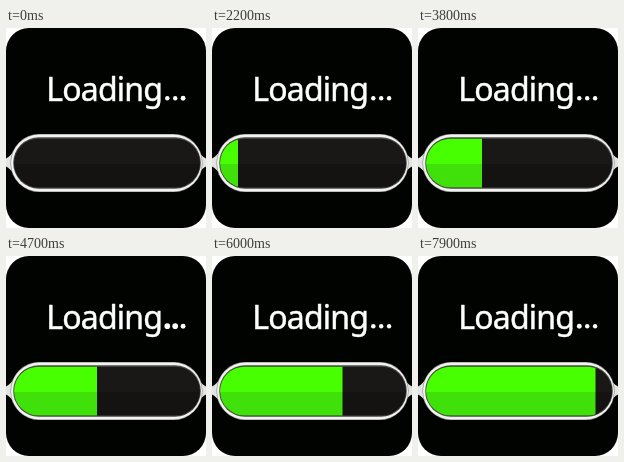
An HTML page that plays this animation: 200 by 200 pixels, repeating every 8000 ms.

```html
<!DOCTYPE html>
<html lang="en">
<head>
<meta charset="utf-8">
<title>Loading</title>
<style>
html, body { margin: 0; width: 100%; height: 100%; overflow: hidden; background: #fff; }
svg { display: block; width: 100vw; height: 100vh; }
text { font: 32px "Noto Sans", "Open Sans", sans-serif; letter-spacing: -.8px; fill: #fff; stroke: #fff; stroke-width: .5px; }
</style>
</head>
<body>
<svg viewBox="0 0 200 200">
  <defs>
    <clipPath id="pill"><rect x="8" y="110.7" width="186" height="48.8" rx="24.4"/></clipPath>
  </defs>
  <rect width="200" height="200" rx="23" fill="#000300"/>
  <text x="40.3" y="72.7">Loading</text>
  <g id="dots" fill="#fff"></g>
  <path d="M10 120Q4 129 0 130.5V138.5Q4 140 10 149ZM190 120Q196 129 200 130.5V138.5Q196 140 190 149Z" fill="#e4e4e2"/>
  <rect x="4.4" y="105.9" width="192.2" height="58.2" rx="29.1" fill="#8c8c8a"/>
  <rect x="5" y="106.5" width="191" height="57" rx="28.5" fill="#f2f2f0"/>
  <rect x="7.2" y="109.3" width="187.6" height="51.4" rx="25.7" fill="#4a4a48"/>
  <g clip-path="url(#pill)">
    <rect x="7" y="109" width="189" height="27" fill="#191817"/>
    <rect x="7" y="136" width="189" height="26" fill="#141312"/>
    <rect class="fill" x="7" y="109" height="27" fill="#48ff02"/>
    <rect class="fill" x="7" y="136" height="26" fill="#40e00a"/>
  </g>
</svg>
<script>
const LOOP = 8000, STEP = 100, PULSE = 1800;

// time in ms, right edge of the fill
const edges = [[0, 7], [900, 10], [1500, 15.5], [2200, 26], [2900, 40], [3600, 58],
  [4700, 91], [6000, 130.5], [6300, 139], [7200, 162], [7900, 177.5], [8000, 179.5]];

// centre, time of the pulse peak, growth
const dots = [[161.3, 1000, 0.7], [169.2, 1200, 0.7], [177.1, 1450, 1.1]];

const group = document.getElementById('dots');
const fills = document.querySelectorAll('.fill');
const circles = dots.map(([x]) => {
  const c = document.createElementNS('http://www.w3.org/2000/svg', 'circle');
  c.setAttribute('cx', x);
  c.setAttribute('cy', 70.2);
  group.append(c);
  return c;
});

function edgeAt(t) {
  const i = edges.findIndex(([time]) => time > t);
  const [t0, x0] = edges[i - 1], [t1, x1] = edges[i];
  return x0 + (x1 - x0) * (t - t0) / (t1 - t0);
}

function bump(t, peak) {
  const d = Math.abs(t - peak);
  const gap = Math.min(d, PULSE - d);
  return gap < 500 ? Math.cos(gap / 500 * Math.PI / 2) ** 2 : 0;
}

function draw(now) {
  const t = Math.floor((now % LOOP) / STEP) * STEP;
  const width = edgeAt(t) - 7;
  fills.forEach(f => f.setAttribute('width', width));
  dots.forEach(([, peak, grow], i) =>
    circles[i].setAttribute('r', 2.2 + grow * bump(t % PULSE, peak)));
}

const start = performance.now();
function tick() {
  draw(performance.now() - start);
  requestAnimationFrame(tick);
}
tick();
</script>
</body>
</html>
```
